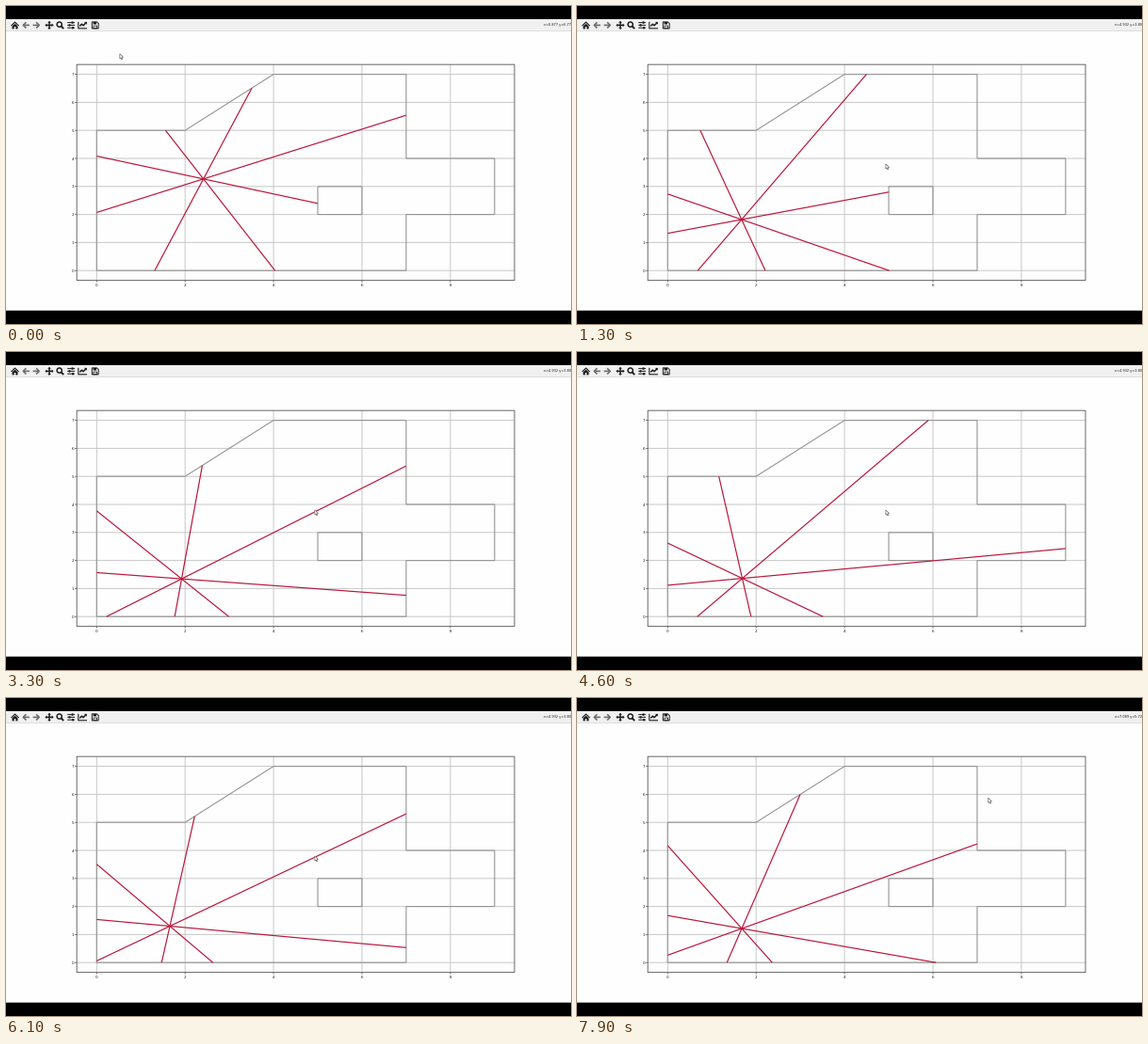
Recreate the animation shown at these times as a matplotlib script. Size 600 by 338 pixels, loop 8000 ms.

```python
import numpy as np
import matplotlib.pyplot as plt
from matplotlib.animation import FuncAnimation
from matplotlib.collections import LineCollection
from matplotlib.patches import Circle, Polygon, Rectangle

plt.rcParams["path.snap"] = False  # keep sub-pixel positions

W, H, DPI = 600, 338, 128
FRAMES, STEP = 80, 100
PT = 72 / DPI  # points per pixel

INK, GREY, WALL, GRID, RAY = "#1c1c1c", "#6c6c6c", "#949494", "#c8c8c8", "#b9183c"
FRAME, TEXT, BAR = "#585858", "#1a1a1a", "#f0f0f0"

ROOM = [(0, 0), (0, 5), (2, 5), (4, 7), (7, 7), (7, 4), (9, 4), (9, 2), (7, 2), (7, 0)]
BOX = [(5, 2), (6, 2), (6, 3), (5, 3)]

# Sensor poses: frame, x, y, heading in degrees
POSES = np.array([
    (0, 2.415, 3.268, 26.35),
    (13, 1.672, 1.82, 16.4),
    (22, 1.416, 1.63, 3.05),
    (33, 1.921, 1.345, -6.6),
    (46, 1.687, 1.362, -36.73),
    (61, 1.655, 1.299, -53.15),
    (79, 1.676, 1.214, -60.45),
])
TIMES, VALUES = POSES[:, 0], POSES[:, 1:]
SLOPES = np.gradient(VALUES, TIMES, axis=0)

MOUSE = np.array([(120.8, 50.8), (327.87, 167.9), (436.7, 106.2)])


def sx(x):
    return 96.3 + 46.95 * np.asarray(x)


def sy(y):
    return 281.2 - 29.8 * np.asarray(y)


LEFT, RIGHT = sx(-.45), sx(9.45)
TOP, BOTTOM = sy(7.35), sy(-.35)


def to_px(points):
    p = np.asarray(points, float)
    return np.column_stack([sx(p[:, 0]), sy(p[:, 1])])


def edges(poly):
    p = np.array(poly, float)
    return p, np.roll(p, -1, axis=0) - p


START, EDGE = (np.vstack(parts) for parts in zip(edges(ROOM), edges(BOX)))


def cross(a, b):
    return a[..., 0] * b[..., 1] - a[..., 1] * b[..., 0]


def cast(pos, angle):
    """Point where a ray first meets a wall."""
    d = np.array([np.cos(angle), np.sin(angle)])
    den = cross(d, EDGE)
    den = np.where(np.abs(den) < 1e-9, 1e-9, den)
    t = cross(START - pos, EDGE) / den
    u = cross(START - pos, d) / den
    hit = (t > 1e-6) & (u >= 0) & (u <= 1)
    return pos + d * t[hit].min()


def pose(k):
    """Cubic Hermite interpolation between the key poses."""
    i = min(np.searchsorted(TIMES, k, side="right") - 1, len(TIMES) - 2)
    h = TIMES[i + 1] - TIMES[i]
    s = (k - TIMES[i]) / h
    return ((1 + 2 * s) * (1 - s) ** 2 * VALUES[i] + s * (1 - s) ** 2 * h * SLOPES[i]
            + s * s * (3 - 2 * s) * VALUES[i + 1] + s * s * (s - 1) * h * SLOPES[i + 1])


def ease(k, begin, length):
    s = np.clip((k - begin) / length, 0, 1)
    return s * s * (3 - 2 * s)


def mouse(k):
    a, b, c = MOUSE
    return a + (b - a) * ease(k, 0, 11) + (c - b) * ease(k, 72.8, 6.2)


def readout(k):
    x, y = mouse(k - 1)
    if y < TOP:
        return "x=0.877 y=6.771"
    return f"x={(x - 96.3) / 46.95:.3f} y={(281.2 - y) / 29.8:.3f}"


fig = plt.figure(figsize=(W / DPI, H / DPI), dpi=DPI, facecolor="#fefefe")
ax = fig.add_axes([0, 0, 1, 1])
ax.set(xlim=(0, W), ylim=(H, 0))
ax.axis("off")


def line(xs, ys, color=INK, width=1.0, z=2):
    ax.plot(xs, ys, color=color, lw=width * PT, zorder=z, solid_capstyle="butt")


def rect(x, y, w, h, color, z=1):
    ax.add_patch(Rectangle((x, y), w, h, fc=color, ec="none", zorder=z))


def shape(points, color=INK, z=6):
    ax.add_patch(Polygon(points, fc=color, ec="none", zorder=z))


def outline(points, color, width, z):
    ax.add_patch(Polygon(points, fc="none", ec=color, lw=width * PT, zorder=z))


def label(x, y, text, size, **kw):
    return ax.text(x, y, text, fontsize=size * PT, family="DejaVu Sans",
                   color=TEXT, zorder=6, **kw)


def draw_window():
    rect(0, 0, W, 14, "black")
    rect(0, 323.7, W, 15, "black")
    rect(0, 14, W, 12.5, BAR)
    line([0, W], [26.5, 26.5], "#dedede")


def draw_icons(y=20.4):
    # home
    shape([(5, y + .3), (9.5, y - 4), (14, y + .3), (13.2, y + 1), (9.5, y - 2.4), (5.8, y + 1)])
    shape([(6.5, y + 1), (9.5, y - 1.6), (12.5, y + 1), (12.5, y + 4), (10.3, y + 4),
           (10.3, y + 1.6), (8.7, y + 1.6), (8.7, y + 4), (6.5, y + 4)])
    # back and forward
    for cx, s in ((21.2, 1), (32.3, -1)):
        line([cx - 2.8 * s, cx + 3.7 * s], [y, y], GREY, 1.6, 6)
        line([cx + .2 * s, cx - 2.9 * s, cx + .2 * s], [y - 3.1, y, y + 3.1], GREY, 1.6, 6)
    # pan
    line([42.5, 49.5], [y, y], width=1.5, z=6)
    line([46, 46], [y - 3.5, y + 3.5], width=1.5, z=6)
    for dx, dy in ((1, 0), (-1, 0), (0, 1), (0, -1)):
        shape([(46 + 4.6 * dx, y + 4.6 * dy),
               (46 + 2.6 * dx + 1.8 * dy, y + 2.6 * dy + 1.8 * dx),
               (46 + 2.6 * dx - 1.8 * dy, y + 2.6 * dy - 1.8 * dx)])
    # zoom
    ax.add_patch(Circle((56.7, y - .8), 2.6, fc="none", ec=INK, lw=1.5 * PT, zorder=6))
    line([58.5, 61.2], [y + 1, y + 3.7], width=1.9, z=6)
    # sliders
    for dy, knob in ((-2.8, 70.5), (0, 67.5), (2.8, 71)):
        line([65.2, 73], [y + dy, y + dy], width=1, z=6)
        rect(knob - .9, y + dy - 1.2, 1.8, 2.4, INK, 6)
    # chart
    line([76.8, 76.8, 86], [y - 3.6, y + 3.4, y + 3.4], width=1.1, z=6)
    line([78.3, 80.4, 82, 85], [y + 1, y - 1.2, y + .4, y - 2.6], width=1.5, z=6)
    shape([(83, y - 3.5), (85.8, y - 3.5), (85.8, y - .7)])
    # save
    outline([(91.3, y - 3.5), (96.4, y - 3.5), (98.2, y - 1.7), (98.2, y + 3.5), (91.3, y + 3.5)],
            INK, 1, 6)
    rect(92.6, y - 3.4, 3.4, 2.5, INK, 6)
    outline([(92.9, y + .7), (96.6, y + .7), (96.6, y + 3.4), (92.9, y + 3.4)], INK, .8, 6)


def draw_plot():
    for x in range(0, 10, 2):
        px = float(sx(x))
        line([px, px], [TOP, BOTTOM], GRID)
        line([px, px], [BOTTOM, BOTTOM + 2], FRAME, .8)
        label(px, 296.6, str(x), 4.1, ha="center", va="center")
    for y in range(8):
        py = float(sy(y))
        line([LEFT, RIGHT], [py, py], GRID)
        line([LEFT - 2, LEFT], [py, py], FRAME, .8)
        label(72, py + .2, str(y), 4.1, ha="right", va="center_baseline")
    outline([(LEFT, TOP), (RIGHT, TOP), (RIGHT, BOTTOM), (LEFT, BOTTOM)], FRAME, .9, 5)
    for poly in (ROOM, BOX):
        outline(to_px(poly), WALL, 1.1, 3)


draw_window()
draw_icons()
draw_plot()

rays = LineCollection([], colors=RAY, linewidths=1.2 * PT, zorder=4)
ax.add_collection(rays, autolim=False)
coords = label(571, 20.4, "", 3.55, ha="left", va="center")
ARROW = np.array([(0, 0), (0, 5.2), (1.2, 4.2), (2, 6), (2.9, 5.6), (2.1, 3.8), (3.7, 3.6)])
pointer = ax.add_patch(Polygon(ARROW, fc="white", ec="#7a7a7a", lw=.8 * PT, zorder=8))


def update(k):
    x, y, heading = pose(k)
    pos = np.array([x, y])
    angles = np.radians(heading + 45 * np.arange(8))
    rays.set_segments([to_px([pos, cast(pos, a)]) for a in angles])
    pointer.set_xy(ARROW + mouse(k))
    coords.set_text(readout(k))
    return rays, pointer, coords


anim = FuncAnimation(fig, update, frames=FRAMES, interval=STEP, repeat=True, repeat_delay=0)
plt.show()
```
